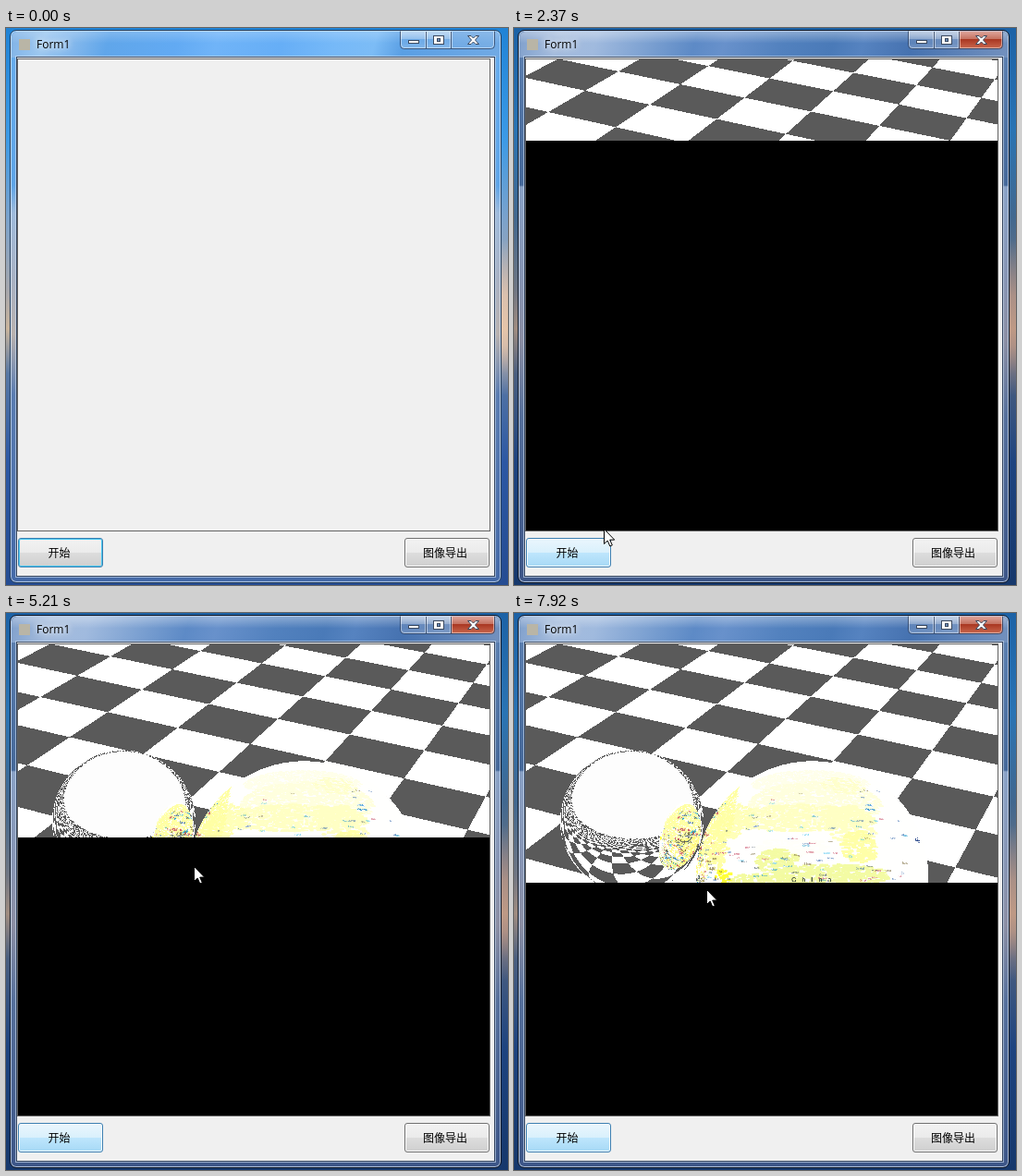
Recreate the animation shown at these times as an HTML page with a canvas. Size 543x603 px, loop 8 s.

```html
<!DOCTYPE html>
<html lang="zh">
<head>
<meta charset="utf-8">
<title>Form1</title>
<style>
html, body { margin: 0; width: 100%; height: 100%; overflow: hidden; }
#stage {
  position: relative; width: 543px; height: 603px; overflow: hidden;
  background: linear-gradient(#0000 38%, #d9a58a88 48%, #d9a58a88 57%, #0000 66%) 536px 0 / 7px 603px no-repeat,
    linear-gradient(#1c62a6, #2a74b4 18%, #42688f 34%, #6f7683 47%, #a08c80 54%, #4a5f80 62%, #1e4480 78%, #16386c);
}
#stage.idle {
  background: linear-gradient(#0000 38%, #f3cdb0aa 48%, #f3cdb0aa 57%, #0000 66%) 536px 0 / 7px 603px no-repeat,
    linear-gradient(#2083d6, #3c9ae6 20%, #7aa2cc 34%, #a5a6ac 47%, #c9b49c 54%, #5878a4 62%, #2c58a4 78%, #254c92);
}
#stage > *, #window > * { position: absolute; box-sizing: border-box; }
#window {
  left: 4px; top: 2px; width: 532px; height: 599px; overflow: hidden;
  border: 1px solid #10192a; border-radius: 7px; box-shadow: inset 0 0 0 1px #dcebfbb0;
  background: linear-gradient(#5f83b4, #46699a 28%, #8aa2c6 28.3%, #8795b4 45%, #8c8fa4 56%, #56709c 70%, #3d5688);
}
.idle #window {
  border-color: #27415f;
  background: linear-gradient(#69aeee, #5fa5e8 28%, #9fbbdc 33%, #a9b2c4 45%, #b9b2b0 55%, #5b7db2 66%, #456aa8);
}
#bar {
  left: 1px; top: 1px; width: 528px; height: 28px; border-radius: 6px 6px 0 0;
  background: linear-gradient(#fff5, #fff0 45%),
    linear-gradient(105deg, #7f9fcb, #a4bcdd 8%, #a0bade 16%, #7ea2d2 26%, #5d8ac6 36%, #6891cb 42%, #5281be 54%, #4a7ab8 64%, #5683c0 70%, #4672b0 80%, #7391be);
}
.idle #bar {
  background: linear-gradient(#fff3, #fff0 45%),
    linear-gradient(105deg, #80b2e6, #9cc8f0 7%, #84b8ec 13%, #60a6ea 20%, #62aaf3 34%, #70b4f8 42%, #66aef6 55%, #76b9f8 66%, #7cbcf6 74%, #5a9fe4 80%, #71aae4);
}
#client {
  left: 11px; top: 31px; width: 518px; height: 563px; background: #f0f0f0;
  border: 1px solid #35455f; box-shadow: 0 0 0 1px #cfe0f49c;
}
#panel { left: 12px; top: 33px; width: 512px; height: 512px; border: 1px solid #646464; }
#scene { left: 13px; top: 34px; }
#cover { left: 13px; top: 34px; width: 510px; height: 510px; background: #000; }
.blank #scene, .blank #cover { display: none; }
#caption { left: 33px; top: 9px; font: 12px/18px "Open Sans", sans-serif; text-shadow: 0 0 6px #fff, 0 0 9px #fffc; }
.button {
  top: 552px; width: 92px; height: 32px; border: 1px solid #707070; border-radius: 3px;
  box-shadow: inset 0 0 0 1px #fcfcfc; text-align: center;
  font: 12px/30px "Noto Sans CJK SC", "Noto Sans CJK", sans-serif;
  background: linear-gradient(#f2f2f2, #ebebeb 50%, #ddd 50%, #cfcfcf);
}
#start { left: 13px; padding-right: 3px; border-color: #3c7fb1; box-shadow: inset 0 0 0 1px #48c8f0; }
#start.hot {
  box-shadow: inset 0 0 0 1px #f4fbff;
  background: linear-gradient(#eaf6fd, #d9f0fc 50%, #bee6fd 50%, #a7d9f5);
}
#save { left: 431px; padding-right: 4px; }
#controls { left: 0; top: 0; }
#cursor { left: 0; top: 0; }
.idle #close { fill: #8ab8e855; }
</style>
</head>
<body>
<div id="stage" class="idle blank">
  <div id="window"><div id="bar"></div></div>
  <svg id="controls" width="543" height="32">
    <defs>
      <linearGradient id="red" x2="0" y2="1">
        <stop stop-color="#dfa79d"/><stop offset=".45" stop-color="#c4705f"/>
        <stop offset=".46" stop-color="#a93621"/><stop offset="1" stop-color="#cb6a50"/>
      </linearGradient>
      <linearGradient id="glass" x2="0" y2="1">
        <stop stop-color="#fff" stop-opacity=".5"/><stop offset=".45" stop-color="#fff" stop-opacity=".28"/>
        <stop offset=".46" stop-color="#fff" stop-opacity=".04"/><stop offset="1" stop-color="#fff" stop-opacity=".25"/>
      </linearGradient>
    </defs>
    <rect x="14" y="12" width="12" height="12" fill="#b9b5a6"/>
    <path d="M426.5 3.500v15q0 4 4 4h51v-19z" fill="url(#glass)"/>
    <path id="close" d="M481.500 3.500v19h43q4 0 4-4v-15z" fill="url(#red)"/>
    <path d="M426.500 3.500v15q0 4 4 4h94q4 0 4-4v-15M454.500 4v18M481.500 4v18" fill="none" stroke="#243a5c" stroke-opacity=".75"/>
    <path d="M427.500 4v14q0 3.500 3.500 3.500h22.500V4M455.500 4v17.500h25V4M482.500 4v17.500h41.500q3.500 0 3.500-3.500V4" fill="none" stroke="#fff" stroke-opacity=".45"/>
    <g fill="#fff" stroke="#3c4a60">
      <rect x="435.500" y="13.500" width="11" height="3"/>
      <rect x="462.500" y="8.500" width="11" height="9"/>
      <rect x="466.500" y="11.500" width="3" height="3" fill="#6d8cb8"/>
      <path d="M499.500 8.500h3.500l2.500 2.500 2.500-2.500h3.500l-4 4.500 4 4.500h-3.500l-2.500-2.500-2.500 2.500h-3.500l4-4.500z"/>
    </g>
  </svg>
  <div id="caption">Form1</div>
  <div id="client"></div>
  <div id="panel"></div>
  <canvas id="scene" width="510" height="262"></canvas>
  <div id="cover"></div>
  <div class="button" id="start">开始</div>
  <div class="button" id="save">图像导出</div>
  <svg id="cursor" width="14" height="21">
    <path d="M.5.5v16l3.700-3.500 2.600 6 2.500-1.100-2.600-5.800h5z" fill="#fff" stroke="#000"/>
  </svg>
</div>
<script>
const $ = id => document.getElementById(id);

let seed = 11;
const random = () => (seed = seed * 16807 % 2147483647) / 2147483647;
const pick = list => list[Math.floor(random() * list.length)];

const dot = (a, b) => a[0] * b[0] + a[1] * b[1] + a[2] * b[2];
const add = (a, b, k = 1) => [a[0] + b[0] * k, a[1] + b[1] * k, a[2] + b[2] * k];
const scale = (a, k) => [a[0] * k, a[1] * k, a[2] * k];
const unit = a => scale(a, 1 / Math.sqrt(dot(a, a)));
const cross = (a, b) => [a[1] * b[2] - a[2] * b[1], a[2] * b[0] - a[0] * b[2], a[0] * b[1] - a[1] * b[0]];

// Camera space: x right, y down, z forward; positions on screen are stage pixels.
const FOCAL = 1256, MID_X = 268, MID_Y = 289;
const ray = (x, y) => [(x - MID_X) / FOCAL, (y - MID_Y) / FOCAL, 1];
const ball = (x, y, r, depth) => ({ c: scale(ray(x, y), depth), r: r / FOCAL * depth });

const globeView = { x: 322, y: 286, r: 125 };
const mirror = ball(128, 226, 77, 8.6);
const globe = ball(globeView.x, globeView.y, globeView.r, 8.42);

// The floor: a corner of the checkerboard and its two cell edges.
const corner = [-2.0988, -3.2768, 17.007];
const edgeU = [.9271, .2398, -.2772], edgeV = [-.3633, .4269, -.8197];
const normal = cross(edgeU, edgeV);
const toU = scale(cross(edgeV, normal), 1 / dot(normal, normal));
const toV = scale(cross(normal, edgeU), 1 / dot(normal, normal));

// Globe map, longitude by latitude.
const MAP_W = 1600, MAP_H = 800, PER_RAD = MAP_W / 2 / Math.PI;

function onMap(x, y) {
  const lat = Math.asin((y - globeView.y) / globeView.r);
  const s = (x - globeView.x) / globeView.r / Math.cos(lat);
  return [MAP_W / 2 + Math.asin(Math.max(-1, Math.min(1, s))) * PER_RAD, MAP_H / 2 + lat * PER_RAD];
}

function drawMap() {
  const canvas = document.createElement('canvas');
  canvas.width = MAP_W;
  canvas.height = MAP_H;
  const c = canvas.getContext('2d', { willReadFrequently: true });
  c.fillStyle = '#fffffe';
  c.fillRect(0, 0, MAP_W, MAP_H);

  // Ragged land made of short horizontal strokes.
  const land = (color, [x, y], rx, ry, density = .13) => {
    c.fillStyle = color;
    for (let n = rx * ry * density; n > 0; n--) {
      const a = random() * 2 * Math.PI, d = Math.sqrt(random());
      c.fillRect(x + Math.cos(a) * d * rx, y + Math.sin(a) * d * ry, 4 + random() * 12, 2 + random() * 4);
    }
  };
  const seen = (color, x, y, rx, ry, density) => land(color, onMap(x, y), rx * 2, ry * 2, density);
  seen('#ffffea', 315, 186, 115, 20);
  seen('#ffffde', 320, 208, 95, 28);
  seen('#ffffcc', 350, 192, 38, 14, .06);
  seen('#ffffc4', 300, 226, 90, 16);
  seen('#ffffb8', 235, 228, 36, 22);
  seen('#ffffc4', 355, 232, 32, 22);
  seen('#ffffa8', 362, 255, 20, 17);
  seen('#fffffa', 295, 256, 42, 9, .1);
  seen('#ffffa8', 222, 262, 16, 18, .08);
  seen('#f4fba4', 280, 270, 22, 13);
  seen('#f3fba4', 335, 284, 62, 12);
  seen('#f3fba0', 265, 289, 40, 8);
  seen('#ffff38', 227, 284, 12, 7);
  land('#ffffa4', [390, 300], 190, 130);
  land('#fff97c', [360, 400], 130, 90, .05);
  land('#e6f39a', [430, 460], 110, 70, .05);
  land('#ffffff', [470, 400], 100, 50, .05);

  const words = ['Tura', 'Lena', 'Omsk', 'Altay', 'Hami', 'Ob', 'Amur', 'Baykal'];
  const inks = ['#2a9fd0', '#3c6cae', '#c8506a', '#7a6a3c', '#4a5a68', '#4fc4ee'];
  const label = ([x, y], size) => {
    c.fillStyle = pick(inks);
    c.font = `${size}px "Liberation Sans", sans-serif`;
    c.fillText(pick(words), x, y);
  };
  for (let n = 0; n < 18; n++) label(onMap(225 + random() * 185, 198 + random() * 38), 6);
  for (let n = 0; n < 75; n++) label(onMap(208 + random() * 205, 236 + random() * 56), 6);
  for (let n = 0; n < 14; n++) label(onMap(202 + random() * 18, 258 + random() * 34), 7);
  for (let n = 0; n < 230; n++) label([150 + random() * 330, 230 + random() * 300], 12);

  const title = (text, x, y, size, color) => {
    c.fillStyle = color;
    c.font = `bold ${size}px "Liberation Sans", sans-serif`;
    c.fillText(text, ...onMap(x, y));
  };
  title('Yana', 372, 215, 9, '#2a8fd0');
  title('Kolyma', 372, 219, 8, '#2a8fd0');
  title('Asia', 427, 250, 15, '#2b4a8c');
  title('C   h   i   n   a', 297, 291, 13, '#4a5348');
  title('M o n g o l i a', 217, 263, 8, '#d0507c');
  return c.getImageData(0, 0, MAP_W, MAP_H).data;
}

const map = drawMap();
const WHITE = [255, 255, 255], DARK = [90, 90, 90];

function distance(o, d, s) {
  const oc = add(s.c, o, -1), b = dot(oc, d);
  const q = b * b - dot(oc, oc) + s.r * s.r;
  const t = q < 0 ? -1 : b - Math.sqrt(q);
  return t > 1e-4 ? t : Infinity;
}

function globeColor(p) {
  const n = scale(add(p, globe.c, -1), 1 / globe.r);
  const lon = Math.atan2(n[0], -n[2]), lat = Math.asin(Math.max(-1, Math.min(1, n[1])));
  const x = Math.floor(MAP_W / 2 + lon * PER_RAD) % MAP_W;
  const y = Math.min(MAP_H - 1, Math.floor(MAP_H / 2 + lat * PER_RAD));
  const k = (y * MAP_W + x) * 4;
  return [map[k], map[k + 1], map[k + 2]];
}

function trace(o, d, reflected = false) {
  const m = reflected ? Infinity : distance(o, d, mirror);
  const g = distance(o, d, globe);
  if (g < m) return globeColor(add(o, d, g));
  if (m < Infinity) {
    const p = add(o, d, m);
    const n = scale(add(p, mirror.c, -1), 1 / mirror.r);
    return trace(p, add(d, n, -2 * dot(d, n)), true);
  }
  const t = dot(normal, add(corner, o, -1)) / dot(normal, d);
  if (t <= 0) return reflected ? [253, 253, 253] : WHITE;
  const p = add(add(o, d, t), corner, -1);
  return (Math.floor(dot(p, toU)) + Math.floor(dot(p, toV))) & 1 ? DARK : WHITE;
}

function render(canvas) {
  const c = canvas.getContext('2d');
  const image = c.createImageData(canvas.width, canvas.height);
  for (let y = 0, k = 0; y < canvas.height; y++) {
    for (let x = 0; x < canvas.width; x++, k += 4) {
      image.data.set(trace([0, 0, 0], unit(ray(x + 13.5, y + 34.5))), k);
      image.data[k + 3] = 255;
    }
  }
  c.putImageData(image, 0, 0);
}

// Keys are [time, ...values]
function at(keys, t) {
  if (t <= keys[0][0]) return keys[0].slice(1);
  const n = keys.findIndex(k => k[0] > t);
  if (n < 0) return keys[keys.length - 1].slice(1);
  const a = keys[n - 1], b = keys[n], f = (t - a[0]) / (b[0] - a[0]);
  return a.slice(1).map((v, i) => v + (b[i + 1] - v) * f);
}

const LOOP = 8000, TICK = 76.6;
const scan = [[770, 34], [835, 38], [1670, 81], [2368, 122], [2520, 130], [3370, 173], [4053, 211], [4220, 217],
  [5050, 240], [5202, 243], [5900, 253], [6734, 267], [7620, 285], [7883, 292]];
const pointer = [[70, 150, 610], [450, 72, 560], [2130, 72, 560], [2360, 97, 542], [2600, 97, 542],
  [3050, 203, 274], [7150, 203, 274], [7450, 208, 299]];

const begin = performance.now();

function frame() {
  const now = (performance.now() - begin) % LOOP;
  const t = now < 70 ? 0 : 70 + Math.floor((now - 70) / TICK) * TICK;
  const [x, y] = at(pointer, t);
  $('cursor').style.transform = `translate(${Math.round(x)}px, ${Math.round(y)}px)`;
  const row = Math.round(at(scan, t)[0]);
  $('cover').style.top = row + 'px';
  $('cover').style.height = 544 - row + 'px';
  $('start').classList.toggle('hot', t > 370);
  $('stage').classList.toggle('idle', t < 450);
  $('stage').classList.toggle('blank', t < 520);
  requestAnimationFrame(frame);
}

render($('scene'));
frame();
</script>
</body>
</html>
```
